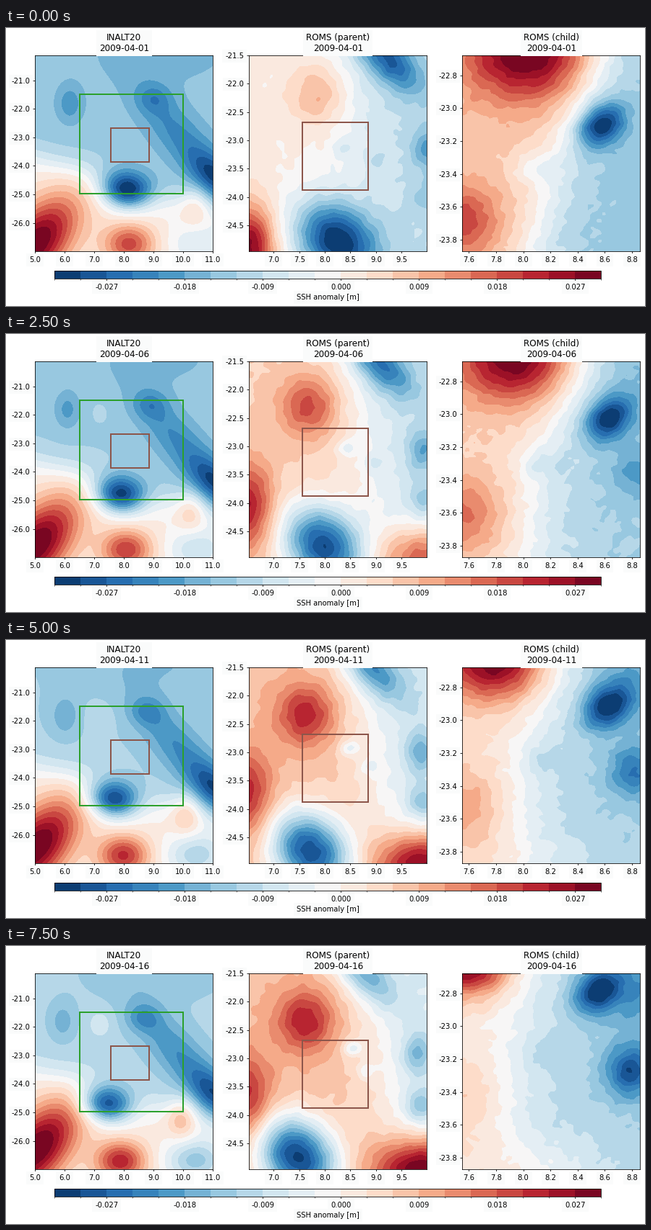
Recreate the animation shown at these times as a matplotlib script. Size 884x386 px, loop 8000 ms.

```python
import numpy as np
import matplotlib.pyplot as plt
from matplotlib.animation import FuncAnimation
from matplotlib.cm import ScalarMappable
from matplotlib.colors import BoundaryNorm, ListedColormap
from matplotlib.patches import Rectangle
from matplotlib.text import Text

W, H, DPI = 884, 386, 72
DAYS = 16
BAND = 0.003
LEVELS = np.arange(-11, 11) * BAND
CMAP = ListedColormap(plt.get_cmap("RdBu_r")((np.arange(21) + 0.5) / 21))
NORM = BoundaryNorm(LEVELS, CMAP.N)
LABEL_BOX = dict(facecolor="#fafbfb", edgecolor="none", pad=4)

plt.rcParams.update({"font.family": "DejaVu Sans", "font.size": 10,
                     "axes.unicode_minus": False})


def mix(a, b, t):
    return np.add(a, t * np.subtract(b, a))


def ease_out(t):
    return 1 - (1 - t) ** 3


def front(offset, width, low, high):
    """Smooth step from low to high across a line."""
    return low + (high - low) / (1 + np.exp(-offset / width))


def eddy(x, y, center, peak, size, tilt=0):
    dx, dy = x - center[0], y - center[1]
    c, s = np.cos(np.radians(tilt)), np.sin(np.radians(tilt))
    u, v = (dx * c + dy * s) / size[0], (dy * c - dx * s) / size[1]
    return peak * np.exp(-0.5 * (u * u + v * v))


# Each sea returns the anomaly in colour bands; x and y are stage pixels
# and t runs from 0 on the first day to 1 on the last.

def inalt_sea(x, y, t):
    def add(start, end, peaks, size, tilt=0):
        return eddy(x, y, mix(start, end, t), mix(*peaks, t), size, tilt)

    z = front(y - 180 - 0.3 * (x - 40) + 8 * t, 12, -4.5 + 0.8 * t, 0.5)
    z += add((40, 300), (42, 282), (9.7, 9.9), (55, 28), -50)
    z += add((170, 300), (158, 299), (6, 7.2), (24, 19))
    z += add((166, 226), (139, 220), (-9.8, -9.6), (25, 18), 8)
    z += add((88, 105), (78, 105), (-2.3, -1.9), (13, 19))
    z += add((205, 98), (190, 100), (-2, -2.4), (17, 14))
    z += add((240, 150), (240, 152), (-2.8, -3.2), (60, 22), 49)
    z += add((290, 208), (290, 208), (-5, -5), (30, 18), 45)
    z += add((215, 35), (205, 35), (-1.1, -1.1), (65, 30))
    z += add((130, 108), (130, 108), (0, 1.2), (13, 15))
    z += add((262, 248), (243, 238), (2.6, 3.6), (14, 19))
    z += add((265, 300), (262, 298), (-2.5, -5), (30, 22))
    return z


def parent_sea(x, y, t):
    g = ease_out(t)

    def add(start, end, peaks, size, tilt=0, pace=t):
        return eddy(x, y, mix(start, end, pace), mix(*peaks, pace), size, tilt)

    z = front(x - 475 - 30 * t - 0.15 * (y - 100), 26, 0.2 + 2.5 * g, -3.2 + t)
    z += add((432, 92), (414, 104), (3.3, 5.4), (28, 30), pace=g)
    z += add((457, 296), (403, 293), (-11, -13), (44, 35), 45)
    z += add((527, 42), (490, 34), (-6.5, -6), (42, 20), 45)
    z += add((582, 168), (568, 150), (-3.5, -3.7), (15, 20))
    z += add((580, 235), (572, 222), (-1.5, -3.5), (14, 17))
    z += add((466, 168), (478, 142), (-1.5, -3.2), (10, 8))
    z += add((512, 185), (497, 173), (-1.2, -1.8), (9, 9))
    z += add((336, 305), (334, 212), (9.2, 5), (24, 42), pace=g)
    z += add((582, 312), (582, 312), (0, 11.5), (48, 32), pace=g)
    return z


def child_sea(x, y, t):
    def add(start, end, peaks, size, tilt=0):
        return eddy(x, y, mix(start, end, t), mix(*peaks, t), size, tilt)

    edge = mix(800 - 0.28 * (y - 60), 715 - 0.1 * (y - 60), t)
    z = front(x - edge, 22 + 13 * t, 2.2 - 1.1 * t, -4.3 + 0.4 * t)
    slow = t ** 1.5
    z += eddy(x, y, mix((722, 32), (640, 28), slow), 8.5 + 0.5 * t,
              mix((60, 48), (40, 28), slow))
    core = 823 + 14 * np.sin(np.pi * t) - 6 * t, 135 - 72 * t ** 1.3
    z += eddy(x, y, core, -7.8 + t, (25, 19), -40)
    z += add((877, 200), (864, 174), (-0.5, -6), (25, 26))
    z += add((870, 60), (870, 60), (0, -3), (40, 40))
    z += add((632, 268), (640, 212), (4.5, 1.5), (36, 36))
    z += add((732, 195), (742, 150), (-2, -1), (22, 16))
    z += add((740, 310), (740, 310), (0, 2), (70, 35))
    return z


def make_ripple(x, y, seed, count=36):
    """Fine drifting texture from random plane waves."""
    rng = np.random.default_rng(seed)
    waves = [(2 * np.pi / rng.uniform(10, 45), rng.uniform(0, np.pi),
              rng.uniform(0, 2 * np.pi), rng.normal(0, 0.35)) for _ in range(count)]

    def ripple(day):
        total = sum(np.cos(k * (x * np.cos(a) + y * np.sin(a)) + phase + drift * day)
                    for k, a, phase, drift in waves)
        return total / np.sqrt(count / 2)

    return ripple


fig = plt.figure(figsize=(W / DPI, H / DPI), dpi=DPI, facecolor="white")


def add_axes(x, y, w, h):
    return fig.add_axes([x / W, 1 - (y + h) / H, w / W, h / H])


class Panel:
    def __init__(self, name, left, lon, lat, xticks, yticks, boxes, sea, rough):
        self.name, self.sea, self.rough, self.fill = name, sea, rough, None
        self.ax = add_axes(left + 0.4, 37.9, 245.8, 271.8)
        nx, ny = 92, 102
        self.x, self.y = np.meshgrid(np.linspace(left, left + 246, nx),
                                     np.linspace(38, 310, ny))
        self.ripple = make_ripple(self.x, self.y, left)
        self.lon, self.lat = np.linspace(*lon, nx), np.linspace(*lat, ny)
        self.ax.set(xlim=lon, ylim=lat[::-1])
        self.ax.set_xticks(xticks, [f"{v:.1f}" for v in xticks])
        self.ax.set_yticks(yticks, [f"{v:.1f}" for v in yticks])
        for (west, east, south, north), color in boxes:
            self.ax.add_patch(Rectangle((west, south), east - west, north - south,
                                        fill=False, ec=color, lw=2, zorder=3))

    def draw(self, day):
        if self.fill is not None:
            self.fill.remove()
        z = self.sea(self.x, self.y, day / (DAYS - 1)) + self.rough * self.ripple(day)
        self.fill = self.ax.contourf(self.lon, self.lat, np.clip(z, -10.99, 9.99) * BAND,
                                     LEVELS, cmap=CMAP, norm=NORM, zorder=0)
        self.ax.set_title(f"{self.name}\n2009-04-{day + 1:02d}")


GREEN = ((6.5, 10.0, -24.97, -21.48), "tab:green")
BROWN = ((7.555, 8.85, -23.875, -22.685), "tab:brown")

panels = [
    Panel("INALT20", 40, (5, 11), (-20.12, -26.99), np.arange(5, 12),
          np.arange(-26, -20), [GREEN, BROWN], inalt_sea, 0),
    Panel("ROMS (parent)", 336, (6.52, 9.995), (-21.5, -24.95), np.arange(7, 9.6, 0.5),
          np.arange(-24.5, -21.4, 0.5), [BROWN], parent_sea, 0.11),
    Panel("ROMS (child)", 631, (7.552, 8.859), (-22.678, -23.87), np.arange(7.6, 8.9, 0.2),
          np.arange(-23.8, -22.7, 0.2), [], child_sea, 0.14),
]

bar = fig.colorbar(ScalarMappable(NORM, CMAP), cax=add_axes(67.4, 337, 756, 11),
                   orientation="horizontal", ticks=np.arange(-9, 10, 3) * BAND,
                   format="%.3f")
bar.ax.minorticks_off()
bar.set_label("SSH anomaly [m]")

for label in fig.findobj(Text):
    label.set_bbox(LABEL_BOX)


def update(day):
    for panel in panels:
        panel.draw(day)
    return []


anim = FuncAnimation(fig, update, frames=DAYS, interval=500, repeat=True,
                     repeat_delay=0, blit=False)
plt.show()
```
